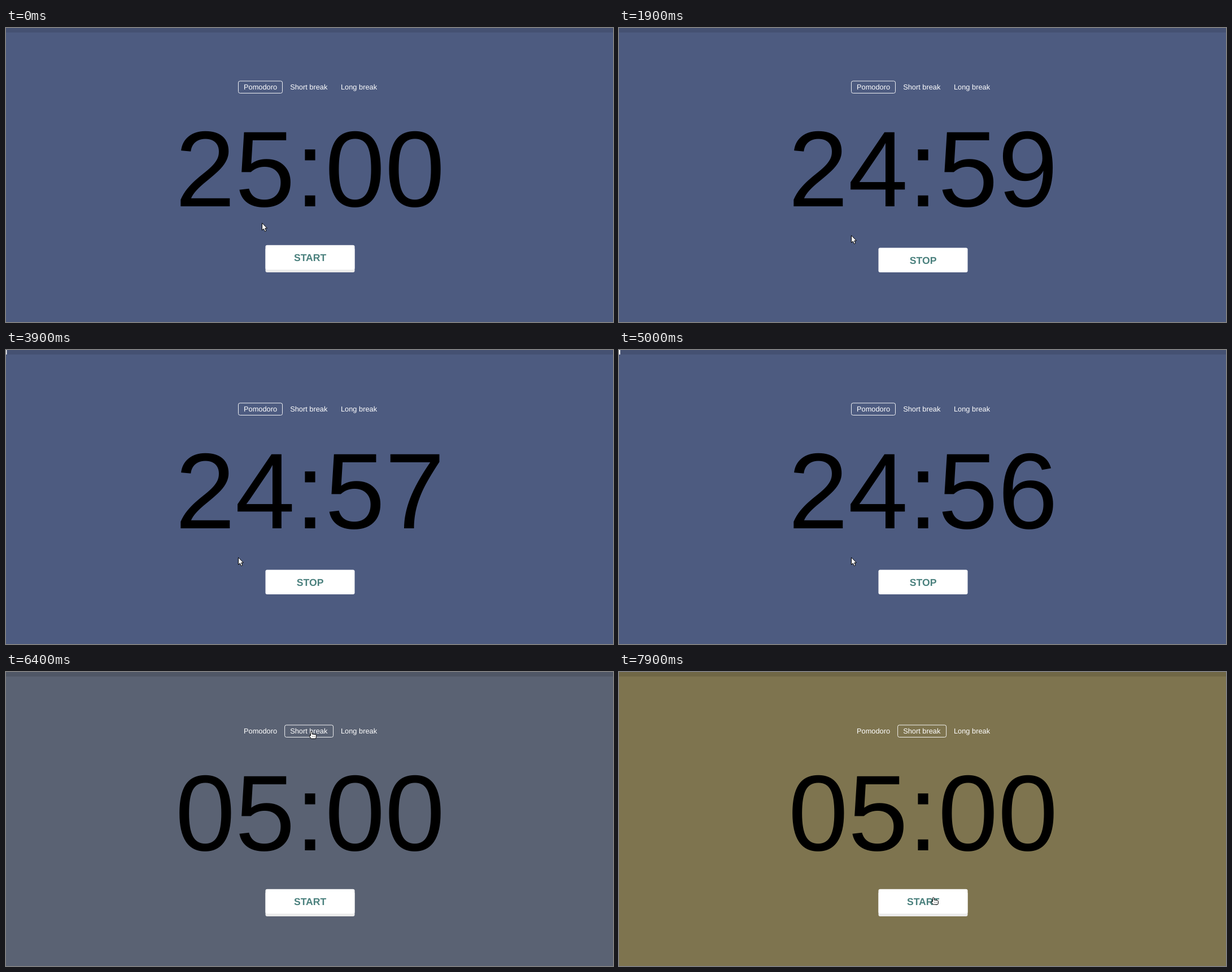
Recreate the animation shown at these times as an HTML page. Size 1075 px wide and 521 px high, loop 8000 ms.

```html
<!DOCTYPE html>
<html lang="en">
<head>
<meta charset="utf-8">
<title>Timer</title>
<style>
  html, body { margin: 0; width: 100%; height: 100%; overflow: hidden; }
  svg { display: block; width: 100%; height: 100%; }
  text { font-family: "Liberation Sans", Arial, sans-serif; text-rendering: geometricPrecision; }
  .tab { font-size: 12.8px; fill: #fff; }
  #clock { font-size: 190.8px; text-anchor: middle; }
  #label { font-size: 17.6px; font-weight: bold; text-anchor: middle; fill: #4a807d; }
  .cursor { fill: #fff; stroke: #000; stroke-linejoin: round; }
</style>
</head>
<body>
<svg viewBox="0 0 1075 521">
  <rect id="bg" width="1075" height="521"/>
  <rect width="1075" height="8" fill="#000" fill-opacity=".11"/>
  <rect id="bar" height="8" fill="#fff"/>
  <rect id="frame" y="94" height="21.5" rx="3" fill="none" stroke="#fff" stroke-opacity=".9"/>
  <text class="tab" x="421" y="109">Pomodoro</text>
  <text class="tab" x="503.2" y="109">Short break</text>
  <text class="tab" x="593" y="109">Long break</text>
  <text id="clock" x="538.4" y="316.3"></text>
  <rect id="edge" x="459.5" y="389.5" width="158" height="43.5" rx="3" fill="#ebebeb"/>
  <rect id="button" x="459.5" width="158" height="43.5" rx="3" fill="#fff"/>
  <text id="label" x="538.6"></text>
  <path id="arrow" class="cursor" d="M.5 .7V13.4L3.4 10.8L5.4 15.5L7.8 14.5L5.8 9.9H9.5Z"/>
  <g id="hand">
    <path class="cursor" d="M-1.5 1.5Q-1.3 .4 -.3 .4T1 1.5V5L7 5.7Q8.6 6 8.6 7.5V10L7.5 13H-.8L-3.4 9Q-4 7.8 -3 7.4L-1.5 8Z"/>
    <path d="M1 9h1M3.4 9h1M5.8 9h1" stroke="#000"/>
  </g>
</svg>
<script>
const LOOP = 8000, STEP = 100, FULL = 1500, BREAK = 300;
const PRESS = 900, SWITCH = 6200;
const BLUE = [77, 91, 128], OLIVE = [126, 116, 79];

// each pointer move eases to its goal and rests there
const HOME = [453, 345];
const MOVES = [
  { from: 0, to: 500, goal: [497, 411] },
  { from: 1150, to: 1900, goal: [411, 367] },
  { from: 5100, to: 5400, goal: [515, 144] },
  { from: 5500, to: 5800, goal: [541, 105] },
  { from: 6800, to: 7100, goal: [574, 124] },
  { from: 7200, to: 7600, goal: [541, 507] },
  { from: 7600, to: 7900, goal: [557, 399] }
];

const $ = id => document.getElementById(id);
const set = (id, attrs) => {
  for (const k in attrs) $(id).setAttribute(k, attrs[k]);
};
const mix = (a, b, k) => a.map((v, i) => Math.round(v + (b[i] - v) * k));
const progress = (t, from, to) => Math.max(0, Math.min(1, (t - from) / (to - from)));
const ease = k => k * k * (3 - 2 * k);
const inside = ([x, y], l, t, r, b) => x >= l && x <= r && y >= t && y <= b;
const pad = n => String(n).padStart(2, "0");
const format = s => pad(Math.floor(s / 60)) + ":" + pad(s % 60);

const pointer = t => MOVES.reduce(
  (p, { from, to, goal }) => mix(p, goal, ease(progress(t, from, to))), HOME);

function draw(time) {
  const t = Math.floor(time / STEP) * STEP;
  const resting = t >= SWITCH;
  const running = t >= PRESS && !resting;
  // the ticks drift slightly past one second
  const spent = Math.max(0, Math.floor((t - 815) / 1020));

  set("bg", { fill: `rgb(${mix(BLUE, OLIVE, progress(t, 6150, 7100))})` });
  set("bar", { width: running ? Math.max(0, spent - 1) / FULL * 1075 : 0 });
  set("frame", resting ? { x: 493.6, width: 86 } : { x: 411.5, width: 78 });
  $("clock").textContent = format(resting ? BREAK : FULL - spent);

  set("edge", { visibility: running ? "hidden" : "visible" });
  set("button", { y: running ? 389.5 : 384.7 });
  set("label", { y: running ? 417.7 : 412.9 });
  $("label").textContent = running ? "STOP" : "START";

  const p = pointer(t);
  const over = inside(p, 459, 385, 618, 433) || inside(p, 493, 94, 580, 116);
  const transform = `translate(${p})`;
  set("arrow", { transform, visibility: over ? "hidden" : "visible" });
  set("hand", { transform, visibility: over ? "visible" : "hidden" });
}

let start;
function loop(now) {
  start ??= now;
  draw((now - start) % LOOP);
  requestAnimationFrame(loop);
}
draw(0);
requestAnimationFrame(loop);
</script>
</body>
</html>
```
